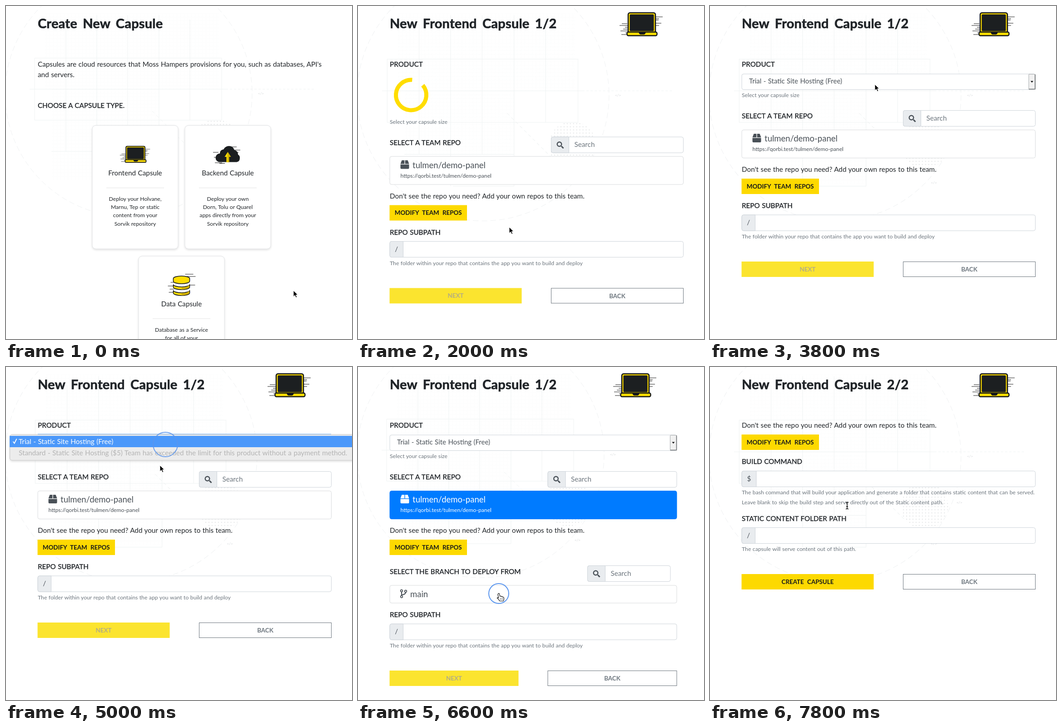
Write an HTML page that moves like this. It is 762 px wide and 735 px high and loops after 8 s.

```html
<!DOCTYPE html>
<html lang="en">
<head>
<meta charset="utf-8">
<title>Create a capsule</title>
<style>
html, body { margin: 0; width: 100%; height: 100%; overflow: hidden; background: #fff; }
svg { display: block; }
text { font: 15.25px Lato, "Open Sans", sans-serif; word-spacing: .6px; fill: #212529; white-space: pre; }
.head { font-size: 29px; font-weight: 700; letter-spacing: .2px; word-spacing: 5px; stroke: #212529; stroke-width: .7px; }
.label { font-size: 15.2px; font-weight: 500; stroke: #212529; stroke-width: .25px; }
.small { font-size: 12.2px; word-spacing: .4px; }
.muted { fill: #6c757d; }
.field { font-size: 15px; fill: #495057; }
.btn { font-size: 13.4px; font-weight: 700; word-spacing: 4px; }
.name { font-size: 18.5px; word-spacing: 5px; }
.tag { font-size: 8px; fill: #d3d6d8; }
.mid { text-anchor: middle; }
</style>
</head>
<body>
<svg id="stage" width="762" height="735" viewBox="0 0 762 735"></svg>
<script>
const LOOP = 8000, STEP = 200;
const YELLOW = '#ffdd00', GOLD = '#fdd900', INK = '#15181a', GREY = '#495057', BLUE = '#007bff';
const stage = document.getElementById('stage');

const text = (x, y, s, cls = '', fill = '') =>
  `<text x="${x}" y="${y}" class="${cls}"${fill && ` style="fill:${fill};stroke:none"`}>${s}</text>`;
const rect = (x, y, w, h, fill = '#fff', stroke = 'none', rx = 0, more = '') =>
  `<rect x="${x}" y="${y}" width="${w}" height="${h}" fill="${fill}" stroke="${stroke}" rx="${rx}" ${more}/>`;
const path = (d, fill = 'none', stroke = 'none', sw = 1, more = '') =>
  `<path d="${d}" fill="${fill}" stroke="${stroke}" stroke-width="${sw}" ${more}/>`;
const circle = (x, y, r, fill = 'none', stroke = 'none', sw = 1, more = '') =>
  `<circle cx="${x}" cy="${y}" r="${r}" fill="${fill}" stroke="${stroke}" stroke-width="${sw}" ${more}/>`;
const at = (x, y, body, k = 1) => `<g transform="translate(${x} ${y}) scale(${k})">${body}</g>`;
const smooth = p => p * p * (3 - 2 * p);

function backdrop(scale) {
  const line = (d, dash = 'none') => path(d, 'none', '#eff3f3', 1, `stroke-dasharray="${dash}"`);
  const tag = (x, y) => text(x, y, '&lt;/&gt;', 'tag');
  return `<defs>
    <pattern id="mesh" width="8" height="8" patternUnits="userSpaceOnUse"><path d="M0 .5H8M.5 0V8" stroke="#f7f9f9" stroke-dasharray="1 2"/></pattern>
    <pattern id="dots" width="6.8" height="6.8" patternUnits="userSpaceOnUse"><circle cx="3" cy="3" r=".8" fill="#c4c7ca"/></pattern>
    <filter id="drop" x="-20%" y="-40%" width="140%" height="200%"><feDropShadow dx="0" dy="2" stdDeviation="2" flood-opacity=".13"/></filter>
  </defs>` + rect(0, 0, 762, 735) + at(0, 0,
    rect(85, 16, 385, 168, 'url(#mesh)') + rect(100, 184, 237, 200, 'url(#mesh)') +
    circle(270, 193, 272, 'none', '#f0f2f3', 1, 'stroke-dasharray="12 7"') +
    line('M63 115H475V252H63ZM52 183.5H484M100 321H337M132 40V321M200 20V390M268 20V321M337 20V390M405 30V252M205 390H337') +
    line('M484 183.5H680', '5 4') + line('M322 232L420 330', '7 6') +
    circle(463, 301, 51, 'url(#dots)') + tag(555, 196) + tag(532, 296) + tag(477, 385), scale);
}

// Short stray strokes beside the icons: [x, y, length]
const glitch = list => path(list.map(([x, y, w]) => `M${x} ${y}h${w}`).join(''), 'none', '#222');

const laptop = () =>
  glitch([[-11, 25, 12], [-16, 29, 18], [-4, 33, 8], [-8, 37, 10], [-14, 41, 16], [-3, 45, 8], [-12, 49, 14],
    [64, 10, 15], [63, 14, 8], [64, 17, 6], [63, 24, 13], [64, 29, 7]]) +
  rect(3, 1, 60, 46, YELLOW, INK, 4, 'stroke-width="2.6"') +
  rect(7, 5, 52, 36, '#1c1f21', INK, 1) +
  rect(.5, 43.5, 66, 8, YELLOW, INK, 3, 'stroke-width="2.4"') +
  path('M26 43h16q-1 6-5 6h-6q-4 0-5-6z', INK);

const cloud = () =>
  glitch([[-6, 14, 12], [-4, 25, 10], [-2, 37, 16], [8, 38.5, 12], [32, 2, 14], [38, 9, 16], [40, 14, 10], [44, 31, 8]]) +
  path('M9 35.5a9.5 9.5 0 0 1 0-19q0-8 8-9 4-7.5 12-7.5 9 0 12 9 8 2 8 10 4 2 4 7 0 9.5-9 9.5z', '#1b1e20') +
  path('M26.5 13l7 11h-4v12h-3z', '#d9b800') + path('M26.5 13l-7 11h4v12h3z', YELLOW);

const database = () => {
  const disc = (y, sweep) =>
    path(`M0 ${y}a18 5.5 0 0 ${sweep} 36 0v6a18 5.5 0 0 1-36 0z`, YELLOW, INK, 1.6) +
    path(`M18 ${sweep ? y - 4.5 : y + 6.2}q13 0 17-${sweep ? -4 : 5}v5q-4 4.5-17 5z`, '#d2b100');
  return glitch([[-6, 14, 10], [-12, 22, 14], [-8, 29, 10], [-10, 36, 12], [26, -4, 18], [30, 1, 19], [34, 20, 14]]) +
    disc(5.5, 1) + disc(18.5, 0) + disc(31.5, 0);
};

const magnifier = (x, y) => at(x, y, path('M10.5 10.5L15 15', 'none', GREY, 3) + circle(6, 6, 4.8, 'none', GREY, 2.4));
const box = (x, y, fill) =>
  at(x, y, path('M3 0h5.8v8H0zM10.2 0H16l3 8h-8.8zM0 9.2h19V17q0 2-2 2H2q-2 0-2-2z', fill));
const branch = (x, y, ink, fill) => at(x, y, path('M3 5v10M12 6q0 5-9 6', 'none', ink, 2) +
  [[3, 3], [3, 16], [12, 4]].map(([cx, cy]) => circle(cx, cy, 2.3, fill, ink, 1.7)).join(''));

function spinner(x, y, t) {
  const period = 1365, sweep = 314, turn = (t - 2000) / period + 10.5;
  const cycle = Math.floor(turn), p = turn - cycle;
  const tail = p > .5 ? smooth(2 * p - 1) * sweep : 0;
  const size = p > .5 ? sweep - tail : smooth(2 * p) * sweep;
  const start = 50 + .2 * (t - 2000) + sweep * (cycle - 10) + tail - 90;
  return circle(x, y, 33.5, 'none', YELLOW, 9,
    `pathLength="360" stroke-dasharray="${size} 360" transform="rotate(${start} ${x} ${y})"`);
}

// Bordered box with a shaded cell at its left end
const group = (x, y, right, cell) => rect(x, y, right - x, 35, '#fff', '#ced4da', 4) +
  path(`M${x + cell} ${y}H${x + 4}q-4 0-4 4v27q0 4 4 4H${x + cell}z`, '#e9ecef', '#ced4da');
const input = (y, sign, cell, right) =>
  group(70, y, right, cell) + text(70 + cell / 2, y + 22, sign, 'mid', GREY);
const search = (x, y, right) =>
  group(x, y, right, 39) + magnifier(x + 12, y + 10) + text(x + 51, y + 22, 'Search', 'muted');

const button = (x, y, w, label, fill, ink) =>
  rect(x, y, w, 34, fill) + text(x + w / 2, y + 21.8, label, 'btn mid', ink);
const backButton = (x, y, right) =>
  rect(x, y + .5, right - x, 33, '#fff', '#6c757d') + text((x + right) / 2, y + 22, 'BACK', 'btn mid', '#6c757d');
const repoHelp = y => text(70, y, "Don't see the repo you need? Add your own repos to this team.") +
  button(69.5, y + 15, 170.5, 'MODIFY TEAM REPOS', GOLD, INK);

function card(x, y, icon, title, lines) {
  const c = x + 94.5;
  return rect(x, y, 189, 272.5, '#fff', '#dfe1e3', 8, 'filter="url(#drop)"') + icon +
    text(c, y + 110.5, title, 'mid') + path(`M${x + 31} ${y + 138}h127`, 'none', '#e4e4e4') +
    lines.map((s, i) => text(c, y + 166.5 + 18.2 * i, s, 'small mid')).join('');
}

const cards = () => backdrop(1) + text(70, 48.5, 'Create New Capsule', 'head') +
  text(70, 134, "Capsules are cloud resources that Moss Hampers provisions for you, such as databases, API's") +
  text(70, 157, 'and servers.') + text(70, 225, 'CHOOSE A CAPSULE TYPE.', 'label') +
  card(190, 263.5, at(262, 309, laptop(), .7), 'Frontend Capsule',
    ['Deploy your Holvane,', 'Marnu, Tep or static', 'content from your', 'Sorvik repository']) +
  card(394, 263.5, at(462, 309, cloud()), 'Backend Capsule',
    ['Deploy your own', 'Dorn, Tolu or Quarel', 'apps directly from your', 'Sorvik repository']) +
  card(292, 552, at(368.5, 596, database()), 'Data Capsule',
    ['Database as a Service', 'for all of your']);

const menu = () => path('M70 149H716', 'none', '#80bdff', 3) +
  rect(8.5, 149, 775, 57, '#ececec', '#c6c6c6', 5, 'filter="url(#drop)"') + rect(8, 152, 760, 25, '#4b98fa') +
  path('M15.5 164.5l3 4 5-10', 'none', '#fff', 1.8) +
  text(28, 170, 'Trial - Static Site Hosting (Free)', '', '#fff') +
  text(28, 194.5, 'Standard - Static Site Hosting ($5) Team has exceeded the limit for this product without a payment method.', '', '#b3b3b3');

const productSelect = right => rect(70, 150, right - 70, 34.5, '#fff', '#ced4da', 4) +
  text(86, 171, 'Trial - Static Site Hosting (Free)', 'field') +
  rect(right - 14.5, 150.5, 14, 33, '#f1f1f1', '#a5a9ac', 1) +
  path(`M${right - .5} 151v32.5h-14`, 'none', '#6b6f72', 1.5) +
  path(`M${right - 10.5} 165.5h6l-3 3.5z`, '#000');

function form(t) {
  const loading = t < 3000, chosen = t >= 5600, branches = t >= 6400, picked = t >= 6800, hover = t >= 7000;
  const right = chosen ? 702 : 716.5, half = chosen ? 418 : 425.5;
  const low = branches ? 106 : chosen ? 125 : 0;
  const row = (y, h, active) => rect(70, y, right - 70, h, active ? BLUE : '#fff', active ? BLUE : '#d9dbdd', 4);
  const repoInk = chosen ? '#fff' : GREY, branchInk = picked ? '#fff' : GREY;

  const repo = text(70, 201, 'Select your capsule size', 'small muted') +
    text(70, 248, 'SELECT A TEAM REPO', 'label') + search(half, 230.5, right) +
    row(273.5, 62, chosen) + box(93.5, 282, repoInk) + text(120, 299, 'tulmen/demo-panel', 'name', repoInk) +
    text(93.5, 320, 'https://qorbi.test/tulmen/demo-panel', 'small', repoInk) + repoHelp(366);

  let extra = '';
  if (branches) {
    extra = text(70, 456.5, 'SELECT THE BRANCH TO DEPLOY FROM', 'label') + search(505.5, 438.5, 688) +
      row(482, 39, picked) + branch(93, 491, branchInk, picked ? BLUE : '#fff') +
      text(115, 507.5, 'main', 'name', branchInk);
  } else if (chosen) {
    extra = spinner(386, 478, t) + text(386, 542, 'Loading Branches', 'name mid');
  }

  const [nextFill, nextInk] = hover ? ['#dfbe00', '#fff'] : picked ? [GOLD, INK] : ['#fbe42f', '#b3ad84'];
  const bottom = text(70, 446, 'REPO SUBPATH', 'label') + input(461, '/', 29.5, right) +
    text(70, 513, 'The folder within your repo that contains the app you want to build and deploy', 'small muted') +
    button(69.5, 564, right - half, 'NEXT', nextFill, nextInk) + backButton(half, 564, right);

  return backdrop(chosen ? 1 : 1.02) + text(70, 48.5, 'New Frontend Capsule 1/2', 'head') +
    at(chosen ? 578 : 592, 14, laptop()) + text(70, 134, 'PRODUCT', 'label') +
    (loading ? spinner(117, 196.5, t) : productSelect(right)) +
    at(0, loading ? 58.5 : 0, repo + extra + at(0, low, bottom)) +
    (t >= 4200 && t < 5200 ? menu() : '');
}

const finish = () => backdrop(1.02) + text(70, 48.5, 'New Frontend Capsule 2/2', 'head') + at(592, 14, laptop()) +
  repoHelp(134) + text(70, 214, 'BUILD COMMAND', 'label') + input(229.5, '$', 32, 716.5) +
  text(70, 281, 'The bash command that will build your application and generate a folder that contains static content that can be served.', 'small muted') +
  text(70, 303, 'Leave blank to skip the build step and serve directly out of the Static content path.', 'small muted') +
  text(70, 339.5, 'STATIC CONTENT FOLDER PATH', 'label') + input(354.5, '/', 29.5, 716.5) +
  text(70, 406, 'The capsule will serve content out of this path.', 'small muted') +
  button(69.5, 457, 291, 'CREATE CAPSULE', GOLD, INK) + backButton(425.5, 457, 716.5);

// Pointer stops: [time, x, y]
const stops = [[0, 633, 628], [200, 633, 628], [1000, 333, 488], [2800, 333, 488], [3600, 363, 173], [4200, 363, 173],
  [4800, 351, 171], [5000, 339, 217], [5400, 337, 290], [6200, 337, 290], [6600, 310, 500], [6800, 310, 500],
  [7100, 293, 687], [7400, 293, 687], [7800, 302, 305], [8000, 302, 305]];
const clicks = [[1200, 333, 488], [4000, 363, 173], [4800, 351, 171], [5600, 336, 291], [6600, 310, 500], [7400, 293, 687]];

const arrow = () => path('M0 0V13.5L3.2 10.6 5.5 15.5 7.8 14.5 5.6 9.7H9.7Z', '#000', '#fff');
const beam = () => path('M-3-6.5q3 0 3 2v11q0 2-3 2M3-6.5q-3 0-3 2M0 6.5q0 2 3 2M-2 3h4', 'none', '#111', 1.4);
const hand = () =>
  path('M-1 0q2-1 2.5 1l1 5q3-1 3.5 1 2-1 3 1 2-.5 2.2 1.5.8 4-1.2 7H2q-2-4-5.5-6.5.5-2 3-.5L-2 2z', '#fff', '#111', 1.2) +
  path('M3.5 10.5v3M6 10.5v3M8.5 10.5v3', 'none', '#111', .8);

function pointer(t) {
  const i = stops.findIndex(s => s[0] > t);
  const [t0, x0, y0] = stops[i - 1], [t1, x1, y1] = stops[i];
  const p = smooth((t - t0) / (t1 - t0));
  const within = (a, b) => t >= a && t < b;
  const overLink = within(1000, 1600) || within(5400, 6400) || within(6600, 7600);
  const shape = t >= 7800 ? beam() : overLink ? hand() : arrow();
  return at(x0 + (x1 - x0) * p, y0 + (y1 - y0) * p, shape);
}

function ring(t) {
  const hit = clicks.find(([start]) => t >= start && t < start + 400);
  if (!hit) return '';
  const late = t - hit[0] >= STEP;
  return circle(hit[1], hit[2], late ? 27 : 22, 'none', '#5b96ee', 2, `stroke-opacity="${late ? .85 : 1}"`);
}

function render(t) {
  const scene = t < 1600 ? cards() : t < 7600 ? form(t) : finish();
  stage.innerHTML = scene + ring(t) + pointer(t);
}

const begin = performance.now();
let shown = -1;
function tick(now) {
  const t = Math.floor(Math.max(0, now - begin) % LOOP / STEP) * STEP;
  if (t !== shown) render(shown = t);
  requestAnimationFrame(tick);
}
render(shown = 0);
requestAnimationFrame(tick);
</script>
</body>
</html>
```
